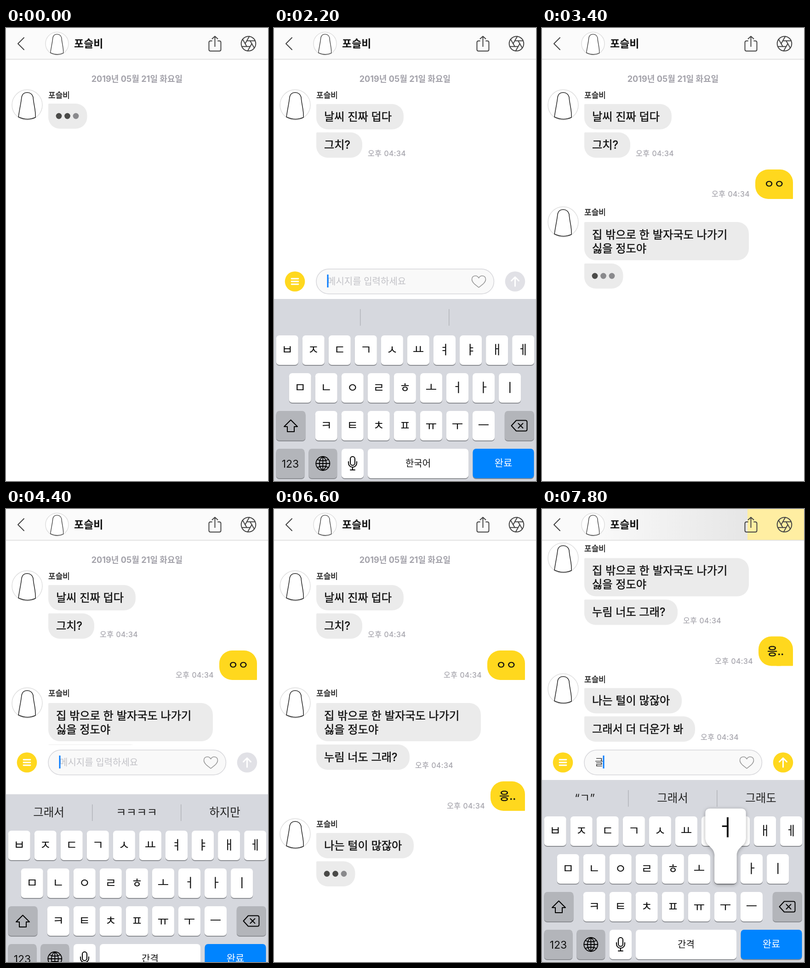
Animation of 570 by 983 pixels, one loop 8000 ms. Source, as an HTML page:

```html
<!DOCTYPE html>
<html lang="ko">
<head>
<meta charset="utf-8">
<style>
html, body { margin: 0; width: 100%; height: 100%; overflow: hidden; background: #fff; }
svg { display: block; width: 570px; height: 983px; }
text { font-family: Inter, 'Noto Sans CJK KR', 'Noto Sans CJK', sans-serif; white-space: pre; }
.icon { fill: none; stroke: #444; stroke-width: 2; stroke-linecap: round; stroke-linejoin: round; }
.key { stroke: #000; }
</style>
</head>
<body>
<svg id="stage" viewBox="0 0 570 983"></svg>
<script>
const LOOP = 8000, STEP = 200, CLOSED = 395;
const NAME = '포슬비';
const GRAY = '#ebebeb', YELLOW = '#ffd81e', MUTED = '#a3a2aa';
const stage = document.getElementById('stage');

// `heavy` thickens the strokes to a medium weight
const text = (x, y, s, size, { fill = '#111', weight = 400, anchor = 'start', gap = 0, heavy = 0 } = {}) =>
  `<text x="${x}" y="${y}" font-size="${size}" fill="${fill}" font-weight="${weight}"` +
  ` text-anchor="${anchor}" letter-spacing="${gap}" stroke="${fill}" stroke-width="${heavy}">${s}</text>`;
const mid = (x, y, s, size, o = {}) => text(x, y, s, size, { ...o, anchor: 'middle' });
const rect = (x, y, w, h, fill, r = 0, extra = '') =>
  `<rect x="${x}" y="${y}" width="${w}" height="${h}" rx="${r}" fill="${fill}" ${extra}/>`;
const circle = (x, y, r, fill, extra = '') => `<circle cx="${x}" cy="${y}" r="${r}" fill="${fill}" ${extra}/>`;
const icon = (d, extra = '') => `<path class="icon" d="${d}" ${extra}/>`;
const move = (x, y, s) => `<g transform="translate(${x} ${y})">${s}</g>`;
const esc = s => s.replace('&', '&amp;');

// ---- Conversation ----
const avatar = (x, y, r) => move(x, y,
  circle(0, 0, r, '#fff', 'stroke="#dedede" stroke-width="1.5"') +
  `<path transform="scale(${r / 33})" d="M-19 26C-16 6 -13 -6 -12 -17Q-10 -27 0 -27T13 -17C14 0 19 10 18 27Q0 35 -19 26Z" fill="#fff" stroke="#222" stroke-width="1.5"/>`);

const sender = y => avatar(46, y, 33) + text(92, y - 15, NAME, 17, { fill: '#222', heavy: 0.5 });
const clock = (x, y) => text(x, y, '오후 04:34', 16, { fill: MUTED, gap: 0.5, heavy: 0.2 });

const bubble = (y, w, h) => rect(92, y, w, h, GRAY, 25) + rect(92, y, 27, 27, GRAY, 2);
const received = (y, w, lines) => bubble(y, w, lines.length > 1 ? 83 : 55) +
  lines.map((s, i) => text(109, y + 35.5 + 30 * i, s, 24.2, { heavy: 0.5 })).join('');
const sent = (x, y, s) => rect(x, y, 82 + 464 - x, 64, YELLOW, 28) + rect(510, y + 32, 36, 32, YELLOW, 1) +
  text(x + 19, y + 40, s, 24.2, { heavy: 0.5 });
const dots = (y, dark) => bubble(y, 84.5, 54.5) +
  [115, 133.5, 152].map((x, i) => circle(x, y + 27, 6.4, i < dark ? '#4a4a48' : '#89898c')).join('');

// [from, to, markup]
const chat = [
  [0, LOOP, mid(285, 116.5, '2019년 05월 21일 화요일', 18.1, { weight: 700, fill: MUTED }) + sender(167)],
  [0, 200, dots(164, 2)],
  [200, 400, dots(164, 3)],
  [400, LOOP, received(165, 190, ['날씨 진짜 덥다'])],
  [600, 800, dots(227, 1)],
  [800, 1000, dots(227, 2)],
  [1000, LOOP, received(226.5, 100, ['그치?']) + clock(204, 278)],
  [2800, LOOP, sent(464, 307, 'ㅇㅇ') + clock(369, 366)],
  [3000, LOOP, sender(421)],
  [3000, 3200, dots(421, 2)],
  [3200, LOOP, received(421, 358, ['집 밖으로 한 발자국도 나가기', '싫을 정도야'])],
  [3400, 3600, dots(511, 1)],
  [3600, 3800, dots(511, 2)],
  [3800, LOOP, received(511, 203, ['누림 너도 그래?']) + clock(307, 562)],
  [5800, LOOP, sent(471, 591, '응..') + clock(376, 650)],
  [6000, LOOP, sender(705)],
  [6000, 6200, dots(703, 2)],
  [6200, LOOP, received(703, 212, ['나는 털이 많잖아'])],
  [6400, 6600, dots(764.5, 1)],
  [6600, 6800, dots(764.5, 2)],
  [6800, LOOP, received(764.5, 241, ['그래서 더 더운가 봐']) + clock(345, 815)]
];

// ---- Header ----
const aperture = circle(0, 0, 15.8, 'none', 'class="icon"') +
  [0, 60, 120, 180, 240, 300].map(a => icon('M3.6 -6.3L12.7 9.4', `transform="rotate(${a})"`)).join('');

const header = flash =>
  rect(0, 0, 570, 67, flash ? 'url(#shade)' : '#fbfbfb') +
  (flash ? rect(447, 0, 123, 67, '#ffeea2') : '') +
  rect(0, 67, 570, 1.5, '#dadada') +
  icon('M39 21L26 34L39 47') + avatar(111, 34, 25) +
  text(148, 42, NAME, 23, { weight: 700 }) +
  icon('M448 28H445Q441.500 28 441.500 31.500V46.500Q441.500 50 445 50H464Q467.500 50 467.500 46.500V31.500Q467.500 28 464 28H461M454.500 40V18M448.500 23.500L454.500 18L460.500 23.500') +
  move(527.5, 34, aperture);

// ---- Input bar ----
const sendLooks = { off: ['#e1e1e6', '#fff'], on: [YELLOW, '#fff'], pressed: ['#544f4a', '#9a9794'] };
const caretAt = { '': 117, 'ㅇ': 135, 'ㅇㅇ': 154, '으': 135, '응': 135, '응.': 141, '응..': 146, '그': 134, '글': 134 };

function inputBar(s) {
  const [fill, arrow] = sendLooks[s.send];
  const active = s.bar < CLOSED;
  return move(0, s.bar,
    rect(0, 512, 570, 471, '#fff') +
    circle(45.5, 550, 21.8, YELLOW) +
    icon('M38 544H53M38 550H53M38 556H53', 'style="stroke:#fff;stroke-width:2.8"') +
    rect(92, 523, 386.5, 54, '#f9f9f9', 27, 'stroke="#d6d6da" stroke-width="1.5"') +
    (s.typed ? text(115, 556.5, s.typed, 20, { fill: '#333' })
             : text(116, 556.5, '메시지를 입력하세요', 20, { fill: '#c2c2c7' })) +
    (active ? rect(caretAt[s.typed] - 1.5, 535, 3, 28, '#087dff') : '') +
    icon('M445.500 563C438 557 430.500 552 430.500 545.500C430.500 537 441 535 445.500 542.500C450 535 460.500 537 460.500 545.500C460.500 552 453 557 445.500 563Z', 'style="stroke:#999;stroke-width:1.6"') +
    circle(524.5, 550, 21.8, fill) +
    icon('M524.500 560V541M516.500 548.500L524.500 540.500L532.500 548.500', `style="stroke:${arrow};stroke-width:3"`));
}

// ---- Keyboard ----
const ROWS = [667, 749, 831, 913];
const PITCH = 57.05;
const cap = (x, y, w, fill = '#fff') =>
  rect(x, y + 2, w, 64, '#8d8f94', 7) + rect(x, y, w, 64, fill, 7);
const DIM = '#b3b5ba';

const row = (labels, x, y, size, drop, w = 48, pitch = PITCH) => [...labels].map((c, i) =>
  cap(x + pitch * i, y, w) + mid(x + pitch * i + w / 2, y + drop, esc(c), size)).join('');

const hangulKeys = row('ㅂㅈㄷㄱㅅㅛㅕㅑㅐㅔ', 4.7, ROWS[0], 27, 41) +
  row('ㅁㄴㅇㄹㅎㅗㅓㅏㅣ', 32.7, ROWS[1], 27, 41) +
  cap(4.5, ROWS[2], 64, DIM) + icon('M36.500 850.500L51 865H44V876H29V865H22Z', 'style="stroke:#000"') +
  row('ㅋㅌㅊㅍㅠㅜㅡ', 89.7, ROWS[2], 27, 41);

const numberKeys = row('1234567890', 4.7, ROWS[0], 32, 44) +
  row('-/:;()₩&@″', 4.7, ROWS[1], 31, 43) +
  cap(4.5, ROWS[2], 64, DIM) + mid(36.5, 870, '#+=', 19) +
  row('.,?!′', 89.7, ROWS[2], 32, 43, 71, 80.1);

const globe = circle(0, 0, 15, 'none', 'class="icon key" style="stroke-width:1.8"') +
  icon('M-15 0H15M0 -15V15M0 -15C-10 -8 -10 8 0 15C10 8 10 -8 0 -15M-12 -8.500Q0 -3 12 -8.500M-12 8.500Q0 3 12 8.500', 'style="stroke:#000;stroke-width:1.8"');
const mic = icon('M-5 -10A5 5 0 0 1 5 -10V-1A5 5 0 0 1 -5 -1ZM-9 -4V-1A9 9 0 0 0 9 -1V-4M0 8V14M-5 14H5', 'style="stroke:#000;stroke-width:2"');

// Pressed key with its enlarged letter above it
function balloon([letter, cx, rowIndex]) {
  const y = ROWS[rowIndex];
  return move(cx, y,
    '<path filter="url(#soft)" fill="#fff" d="M-34 -99H34Q44 -99 44 -89V-36C44 -16 24 -17 24 3V57Q24 64 17 64H-17Q-24 64 -24 57V3C-24 -17 -44 -16 -44 -36V-89Q-44 -99 -34 -99Z"/>' +
    mid(0, -41, letter, 48));
}

// Suggestion: a plain string, or [dark part, faded part] during a cross-fade
const suggestion = (s, i) => {
  const [dark, faded = ''] = [].concat(s);
  return mid([93, 284, 476][i], 636, `${dark}<tspan fill="#85878c">${faded}</tspan>`, 24.5, { fill: '#222' });
};

function keyboard(s) {
  return move(0, s.kb,
    rect(0, 588, 570, 395, '#d6d8de') +
    rect(187, 610, 1.5, 36, '#b2b4b9') + rect(380, 610, 1.5, 36, '#b2b4b9') +
    s.hints.map(suggestion).join('') +
    (s.numbers ? numberKeys : hangulKeys) +
    cap(501.8, ROWS[2], 64, DIM) +
    icon('M516.500 863L527 851.500H547Q550.500 851.500 550.500 855V871Q550.500 874.500 547 874.500H527ZM531.500 858L541.500 868M541.500 858L531.500 868', 'style="stroke:#000"') +
    cap(4.5, ROWS[3], 62, DIM) + mid(35.5, s.numbers ? 951 : 954, s.numbers ? '한글' : '123', s.numbers ? 20 : 23) +
    cap(75.3, ROWS[3], 62, DIM) + move(106.3, 945, globe) +
    cap(147, ROWS[3], 48) + move(171, 945, mic) +
    cap(204, ROWS[3], 219) + mid(313.5, 951.5, s.space, 20) +
    cap(432.5, ROWS[3], 133, '#0084ff') + mid(499, 951, '완료', 21, { fill: '#fff' }) +
    (s.press ? balloon(s.press) : ''));
}

// ---- Timeline: each entry changes part of the state ----
const START = { bar: null, kb: CLOSED, scroll: 0, typed: '', send: 'off', hints: [], numbers: false,
                space: '한국어', press: null, flash: false };
const COMMON = ['그래서', 'ㅋㅋㅋㅋ', '하지만'];
const GEU = ['“ㄱ”', '그래서', '그래도'];
const IEUNG = ['ㅇ', 171, 1];
const reset = { bar: null, scroll: 0, typed: '', send: 'off', numbers: false, press: null };
const rise = { bar: 130, kb: 230, hints: COMMON, space: '간격' };
const timeline = [
  [1000, { bar: CLOSED }],
  [1400, { bar: 130, kb: 230 }],
  [1600, { bar: 0, kb: 31 }],
  [1800, { kb: 0 }],
  [2400, { typed: 'ㅇ', send: 'on', press: IEUNG, space: '간격', hints: ['“ㅇ”', '아니', '응'] }],
  [2600, { typed: 'ㅇㅇ', send: 'pressed', press: null }],
  [2800, { ...reset, kb: 250 }],
  [3000, { kb: CLOSED }],
  [3800, { bar: CLOSED }],
  [4200, rise],
  [4400, { bar: 0, kb: 31 }],
  [4600, { kb: 0, scroll: 61 }],
  [4800, { typed: 'ㅇ', send: 'on', press: IEUNG }],
  [5000, { typed: '으', press: null }],
  [5200, { typed: '응', press: IEUNG }],
  [5400, { typed: '응.', press: null, numbers: true, hints: COMMON }],
  [5600, { typed: '응..', send: 'pressed', hints: [['ㅋㅋ', '서'], ['ㅋ', '다'], ['', '하']] }],
  [5800, { ...reset, kb: 250 }],
  [6000, { kb: CLOSED }],
  [6800, { bar: CLOSED }],
  [7200, rise],
  [7400, { bar: 0, kb: 31 }],
  [7600, { kb: 0, scroll: 314.5, typed: '그', send: 'on', hints: GEU }],
  [7800, { typed: '글', press: ['ㅓ', 399.5, 1], flash: true }]
];

const DEFS = `<defs>
  <linearGradient id="shade"><stop offset=".2" stop-color="#fafafa"/><stop offset=".78" stop-color="#e6e6e6"/></linearGradient>
  <filter id="soft" x="-30%" y="-20%" width="160%" height="140%"><feDropShadow dx="0" dy="2" stdDeviation="4" flood-opacity=".35"/></filter>
</defs>`;

function draw(ms) {
  const s = Object.assign({}, START, ...timeline.filter(([at]) => at <= ms).map(([, change]) => change));
  const visible = chat.filter(([from, to]) => from <= ms && ms < to).map(item => item[2]).join('');
  stage.innerHTML = DEFS + rect(0, 0, 570, 983, '#fff') + move(0, -s.scroll, visible) +
    (s.bar === null ? '' : inputBar(s)) + (s.kb < CLOSED ? keyboard(s) : '') + header(s.flash);
}

const begin = performance.now();
let shown = -1;
function tick() {
  const ms = Math.floor((performance.now() - begin) % LOOP / STEP) * STEP;
  if (ms !== shown) draw(shown = ms);
  requestAnimationFrame(tick);
}
tick();
</script>
</body>
</html>
```
